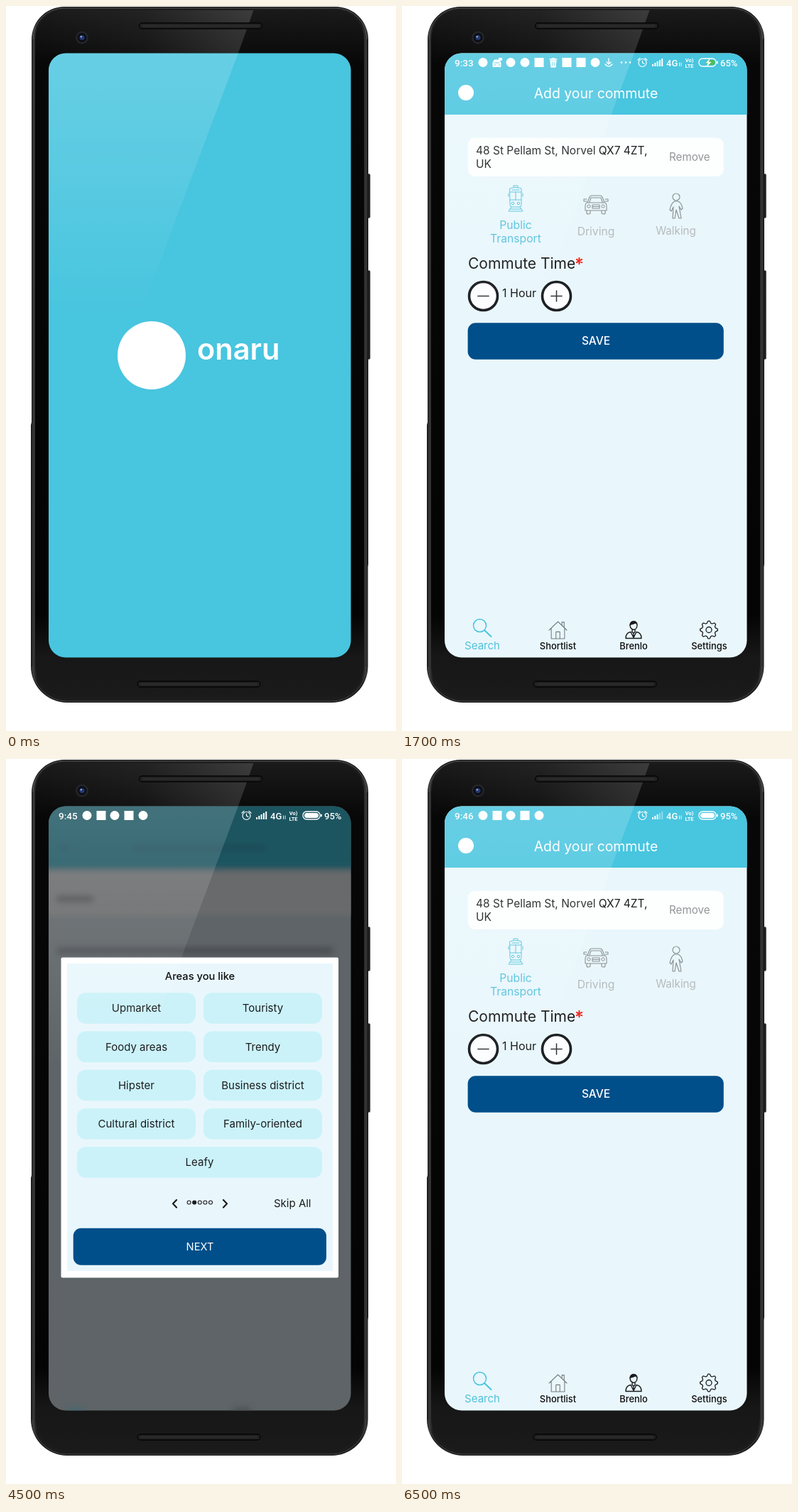
These frames come from a looping animation (549 px wide and 1021 px high, 8 s). An HTML page:

```html
<!DOCTYPE html>
<html lang="en">
<head>
<meta charset="utf-8">
<title>Home search app tour</title>
<style>
html, body { margin: 0; width: 100%; height: 100%; overflow: hidden; background: #fff; }
svg { display: block; width: 549px; height: 1021px; font-family: Inter, Roboto, sans-serif; }
.status { font-family: Roboto, "Open Sans", sans-serif; font-weight: 500; }
</style>
</head>
<body>
<svg id="stage" viewBox="0 0 549 1021" xmlns="http://www.w3.org/2000/svg"></svg>
<script>
const LOOP = 8000;
const STEPS = [
  { at: 0, screen: 'splash' },
  { at: 500, screen: 'commute', status: 'full' },
  { at: 2500, screen: 'criteria', status: 'plain' },
  { at: 4500, screen: 'areas', status: 'late' },
  { at: 6500, screen: 'commute', status: 'later' },
];
const AQUA = '#48c5df', PALE = '#e9f7fc', NAVY = '#004f8a', SOFT = '#c0c6c9', INK = '#1b1c1e', LINE = '#8b9296';

// Drawing helpers
const text = (x, y, s, size, fill = INK, weight = 400, anchor = 'middle') =>
  `<text x="${x}" y="${y}" font-size="${size}" fill="${fill}" font-weight="${weight}" text-anchor="${anchor}">${s}</text>`;
const left = (x, y, s, size, fill, weight) => text(x, y, s, size, fill, weight, 'start');
const box = (x, y, w, h, fill, r = 0) => `<rect x="${x}" y="${y}" width="${w}" height="${h}" rx="${r}" fill="${fill}"/>`;
const dot = (x, y, r, fill) => `<circle cx="${x}" cy="${y}" r="${r}" fill="${fill}"/>`;
const ring = (x, y, r, color, width = 1) =>
  `<circle cx="${x}" cy="${y}" r="${r}" fill="none" stroke="${color}" stroke-width="${width}"/>`;
const line = (d, color, width = 1, fill = 'none') =>
  `<path d="${d}" stroke="${color}" stroke-width="${width}" fill="${fill}" stroke-linecap="round" stroke-linejoin="round"/>`;
const at = (x, y, s) => `<g transform="translate(${x} ${y})">${s}</g>`;
const row = (n, f) => Array.from({ length: n }, (_, i) => f(i)).join('');
const knob = (x, y, r, w, plus) =>
  `<circle cx="${x}" cy="${y}" r="${r}" fill="#fcfdfe" stroke="#1d2024" stroke-width="${w}"/>` +
  line(`M${x - r * .38} ${y}h${r * .76}` + (plus ? `M${x} ${y - r * .38}v${r * .76}` : ''), '#33373a', 1.5);
// Six-armed asterisk centred on x, y
const star = (x, y, r) => line(row(3, i => {
  const a = Math.PI * (i / 3 + .5), dx = r * Math.cos(a), dy = r * Math.sin(a);
  return `M${x - dx} ${y - dy}L${x + dx} ${y + dy}`;
}), '#ee2d24', r * .5);

// Icons, centred on their own origin
const train = color => line(
  'M-8 -14Q0 -17 8 -14V9Q8 12 5 12H-5Q-8 12 -8 9ZM-3 -16V-18H3V-16M-8 -9H8M-8 2H8M0 -9V2' +
  'M-5 -12H5M-10 -3V-7M10 -3V-7M-6 12L-10 18M6 12L10 18M-8 15H8M-9 18H9', color) +
  ring(-4, 7, 1.8, color) + ring(4, 7, 1.8, color);
const car = line(
  'M-12 -3L-9 -11Q-8 -13 -6 -13H6Q8 -13 9 -11L12 -3M-13 -3H13Q15 -2 15 1V8H-15V1Q-15 -2 -13 -3' +
  'M-13 8V12Q-11 14 -8 12V8M13 8V12Q11 14 8 12V8M-5 0H5V5H-5ZM-5 2.5H5M-13 -5H-17V-8H-13M13 -5H17V-8H13M-9 -4L-7 -10H7L9 -4', LINE, 1.1) +
  ring(-10, 2, 2.2, LINE) + ring(10, 2, 2.2, LINE);
const walker = ring(0, -13, 5, LINE, 1.2) + line(
  'M-2 -7Q-7 -5 -9 5L-7 7L-4 1L-5 17H-2L0 5L4 17H7L4 0L7 5L9 3Q7 -6 2 -7Z', LINE, 1.2);
const house = (w, h, color) => line(
  `M${-w} 0L0 ${-h}L${w} 0M${-w * .75} ${-h * .22}V${h}H${w * .75}V${-h * .22}` +
  `M${w * .45} ${-h * .6}V${-h * .95}H${w * .7}V${-h * .34}M${-w * .22} ${h}V${h * .2}H${w * .22}V${h}`, color, 1.1);
const agent = line('M-5 -7C-5 2 5 2 5 -7M-2 0V3L0 5L2 3V0M-11 12Q-11 4 -4 3L0 11L4 3Q11 4 11 12ZM0 6V11', INK, 1.4) +
  line('M-5 -7C-6 -14 6 -14 5 -7L3 -9.5Q-2 -7.5 -5 -7', INK, 1, INK);
const gear = (() => {
  const p = [];
  for (let i = 0; i < 32; i++) {
    const a = (i - .5) * Math.PI / 16, r = i % 4 < 2 ? 12.4 : 9.6;
    p.push(`${(r * Math.cos(a)).toFixed(1)} ${(r * Math.sin(a)).toFixed(1)}`);
  }
  return line(`M${p.join('L')}Z`, INK, 1.3) + ring(0, 0, 4, INK, 1.3);
})();
const tower = line('M-9 17V-14H9V17M-7 -14V-17H7V-14M-14 17H14M-3 17V11H3V17M9 -2H12V17M-9 -2H-12V17', '#a2abb0') +
  row(15, i => `<rect x="${-6 + i % 3 * 4.7}" y="${-11 + (i / 3 | 0) * 4.3}" width="2.6" height="2.4" fill="none" stroke="#a2abb0" stroke-width=".8"/>`);
const bed = line('M-14 0V-13H14V0M-11 0V-6H-2V0M2 0V-6H11V0M-14 0H14L17 5V11H-17V5ZM-17 5H17M-14 11V14M14 11V14M-11 -9Q0 -12 11 -9', '#b3babe');
const sofa = line('M-13 -3V-10Q-13 -14 -9 -14H9Q13 -14 13 -10V-3M0 -14V3M-11 3H11V-1Q12 -4 15 -3Q17 -2 17 1V11H-17V1Q-17 -2 -15 -3Q-12 -4 -11 -1ZM-11 3V8H11V3M-13 11V14M13 11V14', '#a9b1b5');
const lamps = line('M-12 -17V-2M0 -17V4M13 -17V-2M-12 -2L-16 3L-12 8L-8 3ZM13 -2L9 3L13 8L17 3ZM-3 4H3V7H-3Z', '#b3babe') + ring(0, 12, 6.5, '#b3babe');
const four = row(4, i => ring(i % 2 ? 10 : -10, i > 1 ? 10 : -10, 7.3, AQUA, 1.2));

// Status bar
const disc = x => dot(x, 79.5, 6.5, '#fff');
const tile = x => box(x - 6.5, 73, 13, 13, '#fff');
const taxi = x => at(x, 80, line('M-6 5V0L-4 -4H3L5 0V5ZM-5 5V6M4 5V6', '#fff', 1, '#fff') +
  line('M-4 0H3M-4 3H-2M2 3H4', AQUA, 1) + box(2, -7, 5, 4, '#fff'));
const bin = x => at(x, 80, line('M-5 -5H5M-2 -6H2M-4 -3L-3 6H3L4 -3Z', '#fff', 1.3, '#fff') + line('M-1.3 -1V4M1.3 -1V4', AQUA, .8));
const download = x => line(`M${x} 74V81M${x - 3} 79L${x} 82L${x + 3} 79M${x - 5} 82Q${x} 88 ${x + 5} 82`, '#fff', 1.4);
const more = x => row(3, i => dot(x - 6 + i * 6, 79.5, 1.3, '#fff'));
const ICON_ROWS = {
  full: disc(114) + taxi(134) + disc(153) + disc(173) + tile(193) + bin(213) + tile(232) + tile(252) + disc(272) + download(291) + more(315),
  plain: '',
  late: disc(114) + tile(134) + disc(153) + tile(173) + disc(193),
};
ICON_ROWS.later = ICON_ROWS.late;

function statusBar(time, icons, charge, bars = 5) {
  const low = charge < 90;
  return `<g class="status">` + left(74, 84.5, time, 13.5, '#fff', 500) + icons +
    ring(338.5, 80, 5.5, '#fff', 1.2) +
    line('M338.5 77V80L341 81.5M332 76L335 73.5M345 76L342 73.5', '#fff', 1.2) +
    row(5, i => `<rect x="${352 + i * 3.3}" y="${82 - i * 2}" width="2" height="${3 + i * 2}" fill="#fff" opacity="${i < bars ? 1 : .4}"/>`) +
    left(372, 84.5, '4G', 13, '#fff', 500) +
    line('M390.5 80V84.5M393 80V84.5', '#fff', .9) +
    text(404.5, 79, 'Vo)', 7.5, '#fff', 700) + text(404.5, 87, 'LTE', 7.5, '#fff', 700) +
    `<rect x="418" y="74" width="24" height="11" rx="5" fill="none" stroke="#fff" stroke-width="1.3"/>` +
    box(443, 77.5, 1.7, 4, '#fff', 1) +
    (low ? box(428, 76, 12.5, 7, '#4fbf5b', 3.5) + line('M433 74.5L428 80H431L429 85L435 79H431.5Z', '#fff', .6, '#fff')
         : box(420, 76, 20, 7, '#fff', 3.5)) +
    left(448, 84.5, charge + '%', 13, '#fff', 500) + '</g>';
}

// Screens
const header = (h, title, size) => box(60, 66, 426, h, AQUA) + text(273, 129.5, title, size, '#fff');

const splash = box(60, 66, 426, 852, AQUA) + dot(205, 492, 48, '#fff') + left(269, 498, 'onaru', 41.5, '#fff', 600);

const commute = box(60, 66, 426, 852, PALE) + header(87, 'Add your commute', 19.4) +
  dot(90, 122, 11, '#fff') +
  box(92.6, 185.5, 360.2, 54.5, '#fdfefe', 10) +
  left(104, 209, '48 St Pellam St, Norvel QX7 4ZT,', 15.5) + left(104, 227.5, 'UK', 15.5) +
  left(376, 218, 'Remove', 15.2, '#929699') +
  at(160, 271, train('#55c4de')) + at(273, 280, car) + at(386, 282, walker) +
  text(160, 314, 'Public', 15.7, '#58c2dc') + text(160, 333, 'Transport', 15.7, '#58c2dc') +
  text(273, 323, 'Driving', 15.7, '#b6babd') + text(385.5, 322, 'Walking', 15.2, '#b6babd') +
  left(93, 370, 'Commute Time', 21) + star(249.5, 359, 4.2) +
  knob(114.5, 408.5, 20, 3.6) + left(141, 410, '1 Hour', 16) + knob(217.5, 408.5, 20, 3.6, true) +
  box(92.6, 446.2, 360.2, 51.6, NAVY, 11) + text(273, 477, 'SAVE', 15.5, '#fff', 500) +
  ring(109.5, 872.5, 9, AQUA, 1.5) + line('M116 879L125.5 888', AQUA, 2) +
  text(113, 906, 'Search', 15, '#4fc1dc') +
  at(219.5, 879, house(12.5, 12, '#777d80')) + text(219.5, 906, 'Shortlist', 12.9, '#0c0d0e', 500) +
  at(326, 878.5, agent) + text(326, 906, 'Brenlo', 12.9, '#0c0d0e', 500) +
  at(432, 878.5, gear) + text(432.5, 906, 'Settings', 12.9, '#0c0d0e', 500);

const stop = x => dot(x, 374, 15.7, '#7fd1ea') + dot(x, 374, 5, '#2dabdf');
const choice = (x, y, icon, ly, label, color = SOFT) => at(x, y, icon) + text(x, ly, label, 15.1, color);
const heading = (x, y, s, size, starX) => left(x, y, s, size, '#0c0d0e', 600) + star(starX, y - 10.5, 2.8);
const criteria = box(60, 66, 426, 852, PALE) + header(139, 'Enter Search Criteria', 19.2) +
  line('M99 123H83M90 115.5L82.5 123L90 130.5', '#fff', 1.6) +
  text(166, 184.5, 'Basic', 15, '#fff') + text(379, 184.5, 'Advanced', 14.9, '#94dbeb') +
  box(60, 202, 213, 3, '#fff') +
  heading(91, 253, 'Price range per calendar month', 19.6, 394) +
  knob(104.5, 282, 16.2, 2.9) + left(130, 286, '£ 200', 14.6) + left(130, 304, 'Minimum', 15) + knob(218, 282, 16.2, 2.9, true) +
  knob(323.5, 282, 16.2, 2.9) + left(349, 286, '£ 5,000', 14.6) + left(346, 304, 'Maximum', 15) + knob(441, 282, 16.2, 2.9, true) +
  heading(82, 344, 'Number of bedrooms', 19.3, 286) +
  line('M99 374H446M99 369V379M272.5 369V379M446 369V379', '#cad6da') +
  line('M186 374H360', '#2dabdf', 4) + stop(186) + stop(360) +
  left(82, 408, 'Room', 15) + left(86, 426, '&amp; Studio', 15) +
  text(188, 408, '1', 15) + text(273, 408, '2', 15) + text(360, 408, '3', 15) + text(454, 408, '4+', 15) +
  heading(82, 466, 'Type of Property', 20, 244.5) +
  choice(129, 507, house(17, 17, '#7f898e'), 539, 'House') +
  choice(224, 507, tower, 539, 'Flat') + choice(320, 507, four, 539, 'All', '#3fbfdb') +
  heading(82, 581, 'Furnishing', 19.5, 187) +
  choice(129, 619, bed, 651, 'Furnished') + choice(224, 619, sofa, 651, 'Semi') + text(226, 669, 'Furnished', 15.1, SOFT) +
  choice(320, 620, lamps, 651, 'Unfurnished') + choice(415.5, 619, four, 651, 'All', '#3fbfdb') +
  box(60, 844, 426, 74, '#fbfbfb') + box(81.6, 843.6, 382.2, 51.8, NAVY, 10) + text(273, 877, 'Search Now', 22.4, '#fff');

const AREAS = ['Upmarket', 'Touristy', 'Foody areas', 'Trendy', 'Hipster', 'Business district', 'Cultural district', 'Family-oriented'];
const chip = (x, y, w, label) => box(x, y, w, 43.5, '#cbf2f9', 12) + text(x + w / 2, y + 27, label, 15);
const areas = box(60, 66, 426, 852, '#5e6467') +
  `<g filter="url(#blur)">` + box(30, 30, 490, 126, '#1f5561') + box(30, 158, 490, 62, '#696b6c') +
  box(178, 121, 188, 9, '#1b4b56') + box(76, 120, 14, 8, '#1b4b56') + box(71, 192, 52, 10, '#4b4d4e') + box(72, 265, 388, 10, '#4a4e51') +
  box(86, 914, 24, 8, '#3f6973') + box(320, 914, 24, 8, '#484e51') + '</g>' +
  box(77.5, 279.5, 390.5, 451, '#fff', 2) + box(86, 288, 374, 433, PALE) +
  text(273, 311, 'Areas you like', 14.7, '#0c0d0e', 500) +
  AREAS.map((s, i) => chip(i % 2 ? 278 : 100, 329.3 + (i >> 1) * 54.2, 167, s)).join('') + chip(100, 546.2, 345, 'Leafy') +
  line('M240 621L235 626.3L240 631.5M306 621L311 626.3L306 631.5', INK, 2.2) +
  row(5, i => `<circle cx="${257.6 + i * 7.6}" cy="624.5" r="2.5" fill="${i === 1 ? INK : 'none'}" stroke="${INK}" stroke-width="1.1"/>`) +
  left(377, 631, 'Skip All', 15) +
  box(94.7, 660.8, 356.2, 52, NAVY, 11) + text(273, 692, 'NEXT', 14.7, '#fff');

// Phone shell
const BODY = 'M82 1H464A46 46 0 0 1 510 47V786L509.5 790V930A51 51 0 0 1 458 981H86A51 51 0 0 1 35 930V590L36 586V47A46 46 0 0 1 82 1Z';
const speaker = (x, y) => `<rect x="${x}" y="${y}" width="173" height="8" rx="4" fill="#202020" stroke="#050505" stroke-width="1.4"/>` +
  `<path d="M${x + 5} ${y + 4}h163" stroke="#343434" stroke-width="3" stroke-dasharray="1 1"/>`;
const phone = line('M511 238V297M511 374V496', '#202020', 3.4) +
  `<path d="${BODY}" fill="url(#metal)"/>` +
  `<path d="M38 47A44 44 0 0 1 82 3H464A44 44 0 0 1 508 47" fill="none" stroke="#565656"/>` +
  `<path d="M37 930A49 49 0 0 0 86 979H458A49 49 0 0 0 507 930" fill="none" stroke="#444"/>` +
  `<path d="M82 6H463A41 41 0 0 1 504 47V928A45 45 0 0 1 459 973H86A45 45 0 0 1 41 928V47A41 41 0 0 1 82 6Z" fill="url(#glass)"/>` +
  `<path d="M82 6H348.5L327 66H41V47A41 41 0 0 1 82 6Z" fill="url(#sheen)"/>` +
  speaker(187.5, 24) + speaker(185, 951) +
  dot(107, 44.5, 9, '#242629') + dot(107, 44.5, 6.5, '#0c0e16') + dot(107, 44.5, 3.6, '#24386e') + dot(105.8, 43.3, 1.3, '#8fa4d8');

const stops = list => list.map(([o, c, a = 1]) => `<stop offset="${o}" stop-color="${c}" stop-opacity="${a}"/>`).join('');
const defs = `<defs>
  <linearGradient id="metal">${stops([[0, '#161616'], [.008, '#3a3a3a'], [.018, '#1c1c1c'], [.98, '#1c1c1c'], [.994, '#373737'], [1, '#111']])}</linearGradient>
  <linearGradient id="glass" x2="0" y2="1">${stops([[0, '#1a1a1a'], [.08, '#070707'], [.88, '#040404'], [.94, '#171717'], [1, '#1a1a1a']])}</linearGradient>
  <linearGradient id="sheen">${stops([[0, '#fff', 0], [.5, '#fff', .04], [1, '#fff', .15]])}</linearGradient>
  <linearGradient id="glare" x2="0" y2="1">${stops([[0, '#fff', .17], [.5, '#fff', .09], [1, '#fff', 0]])}</linearGradient>
  <filter id="blur" x="-10%" y="-10%" width="120%" height="120%"><feGaussianBlur stdDeviation="4"/></filter>
  <clipPath id="display"><rect x="60" y="66.5" width="425.5" height="851" rx="24"/></clipPath>
</defs>`;

const layers = {
  splash, commute, criteria, areas,
  full: statusBar('9:33', ICON_ROWS.full, 65),
  plain: statusBar('9:33', ICON_ROWS.plain, 65),
  late: statusBar('9:45', ICON_ROWS.late, 95),
  later: statusBar('9:46', ICON_ROWS.later, 95, 3),
};
document.getElementById('stage').innerHTML = defs + phone + '<g clip-path="url(#display)">' +
  Object.entries(layers).map(([id, s]) => `<g id="${id}" visibility="hidden">${s}</g>`).join('') +
  '<path d="M60 66H327L189 434H60Z" fill="url(#glare)" pointer-events="none"/></g>';

const groups = Object.keys(layers).map(id => document.getElementById(id));
let shown;
function show(now) {
  const t = now % LOOP;
  const step = STEPS.filter(s => s.at <= t).pop();
  if (step === shown) return;
  shown = step;
  for (const g of groups) {
    g.setAttribute('visibility', g.id === step.screen || g.id === step.status ? 'visible' : 'hidden');
  }
}
const start = performance.now();
function tick() {
  show(performance.now() - start);
  requestAnimationFrame(tick);
}
tick();
</script>
</body>
</html>
```
